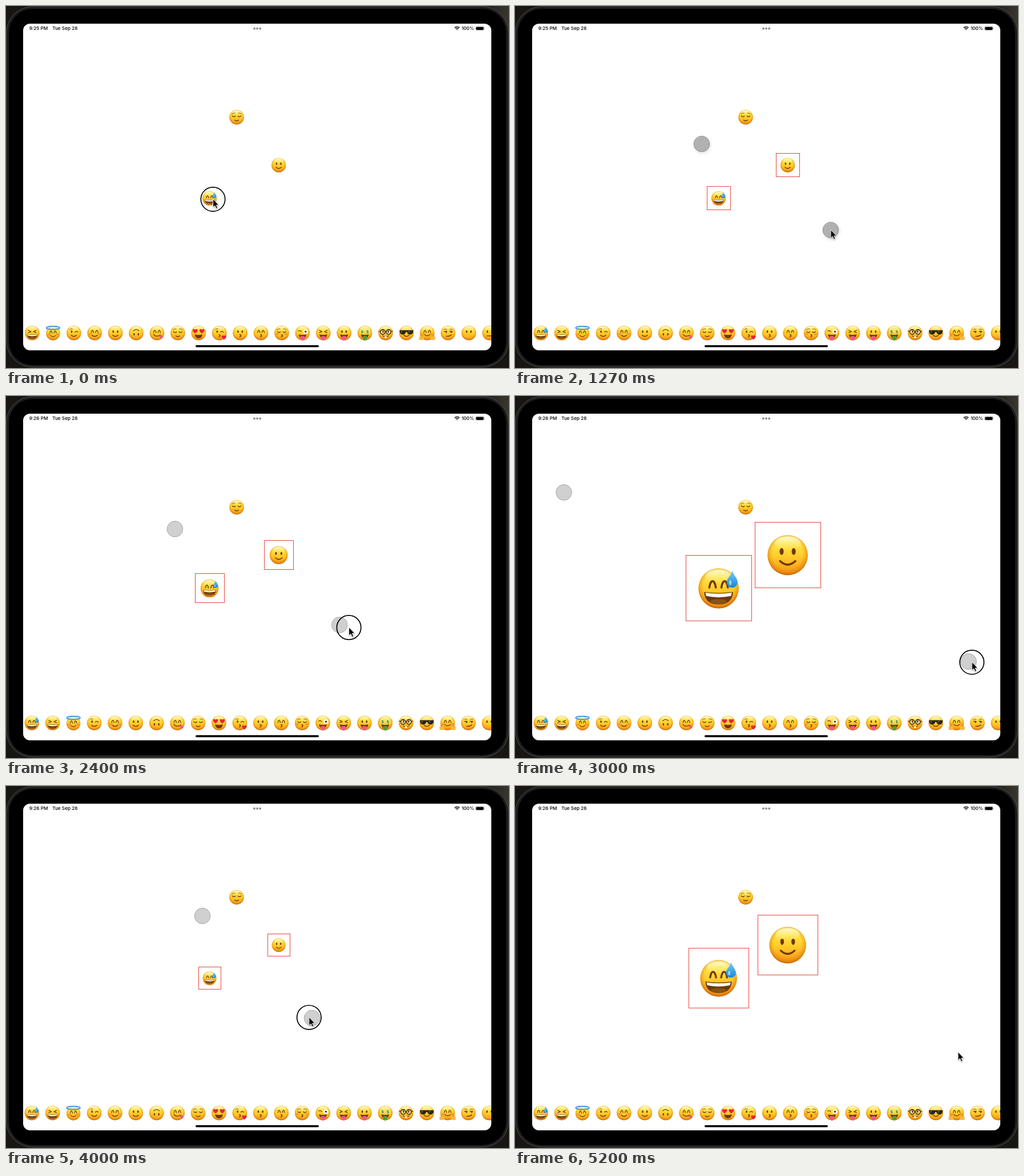
An HTML page that plays this animation: 881 by 635 pixels, repeating every 5270 ms.

```html
<!DOCTYPE html>
<html lang="en">
<head>
<meta charset="utf-8">
<title>Pinch to resize</title>
<style>
  html, body { margin: 0; width: 100%; height: 100%; overflow: hidden; background: #171612; }
  svg { display: block; width: 881px; height: 635px; }
  .status { font: 500 8.2px Inter, "Liberation Sans", sans-serif; fill: #000; }
  .line { fill: none; stroke: #6b390d; stroke-width: 5; stroke-linecap: round; stroke-linejoin: round; }
  .brow { fill: none; stroke: #8f530d; stroke-width: 4; stroke-linecap: round; }
  .dark { fill: #6b390d; }
  .frame { fill: none; stroke: #e2493f; stroke-width: 1; }
  .money { font: bold 30px "Liberation Sans", sans-serif; fill: #3d7a1a; text-anchor: middle; }
  .touch circle { stroke-width: .8; }
  .touch.hover circle { fill: rgba(0,0,0,.25); stroke: #808080; filter: drop-shadow(1.5px 2.5px 2.5px rgba(0,0,0,.3)); }
  .touch.down circle { fill: rgba(0,0,0,.185); stroke: #999; }
</style>
</head>
<body>
<svg viewBox="0 0 881 635">
  <defs>
    <linearGradient id="skin" x2="0" y2="1">
      <stop offset="0" stop-color="#fff08a"/>
      <stop offset=".22" stop-color="#ffe348"/>
      <stop offset=".55" stop-color="#ffca29"/>
      <stop offset=".85" stop-color="#f9a41b"/>
      <stop offset="1" stop-color="#f09215"/>
    </linearGradient>
    <radialGradient id="rim" cy=".46" r=".55">
      <stop offset=".68" stop-color="#e07a08" stop-opacity="0"/>
      <stop offset=".87" stop-color="#dc7407" stop-opacity=".45"/>
      <stop offset="1" stop-color="#ac5203" stop-opacity=".9"/>
    </radialGradient>
    <linearGradient id="shine" x2="0" y2="1">
      <stop offset="0" stop-color="#fffde0" stop-opacity=".8"/>
      <stop offset="1" stop-color="#fff6a0" stop-opacity="0"/>
    </linearGradient>
    <linearGradient id="water" x2="0" y2="1">
      <stop offset="0" stop-color="#7fcdf5"/>
      <stop offset="1" stop-color="#1386dc"/>
    </linearGradient>
    <linearGradient id="corner">
      <stop offset="0" stop-color="#1a1916"/>
      <stop offset="1" stop-color="#3a372f"/>
    </linearGradient>
    <clipPath id="screen"><rect x="30" y="31" width="820" height="573" rx="12"/></clipPath>
    <g id="base">
      <circle r="50" fill="url(#skin)"/>
      <circle r="50" fill="url(#rim)"/>
      <ellipse cy="-29" rx="33" ry="17" fill="url(#shine)"/>
    </g>
    <g id="faces"></g>
  </defs>

  <rect width="881" height="635" fill="#171612"/>
  <rect x="830" width="51" height="50" fill="url(#corner)"/>
  <rect x=".7" y="1" width="879.6" height="632.5" rx="46" fill="#1b1b1b" stroke="#555" stroke-width=".9"/>
  <rect x="4.5" y="4.5" width="872" height="626" rx="42" stroke="#2c2c2c" stroke-width=".7"/>
  <rect x="30" y="31" width="820" height="573" rx="12" fill="#fff"/>

  <g class="status">
    <text id="clock" x="40.7" y="42">9:25 PM</text>
    <text x="81.2" y="42">Tue Sep 28</text>
    <text x="820" y="42" text-anchor="end">100%</text>
  </g>
  <g fill="#8e8e90"><circle cx="435" cy="39.5" r="1.9"/><circle cx="440" cy="39.5" r="1.9"/><circle cx="445.2" cy="39.5" r="1.9"/></g>
  <g fill="none" stroke="#000" stroke-width="1.4">
    <path d="M785.8 38.2a6 6 0 0 1 8.6 0M787.5 40a3.6 3.6 0 0 1 5.2 0"/>
    <path d="M790.1 42.4l-1.2-1.3a1.8 1.8 0 0 1 2.4 0z" fill="#000" stroke="none"/>
  </g>
  <rect x="822.4" y="35.8" width="15" height="7" rx="2.1" fill="none" stroke="#999" stroke-width=".6"/>
  <rect x="823.3" y="36.7" width="13.2" height="5.2" rx="1.4"/>
  <path d="M838.3 38.2q1.3 1 0 2.2z" fill="#888"/>

  <g clip-path="url(#screen)">
    <g id="dock"></g>
    <use href="#relieved" transform="translate(404 195) scale(.255)"/>
    <g id="items"></g>
  </g>
  <rect x="332" y="595" width="216" height="3.6" rx="1.8"/>

  <g id="touch" class="touch"><circle r="13.8"/><circle r="13.8"/></g>
  <circle id="ring" r="21.2" fill="none" stroke="#000" stroke-width="1.7"/>
  <path id="cursor" d="M0-.5V14.2L3.3 11.1L5.7 16.4L8.2 15.3L5.8 10.2H10.2Z" stroke="#fff" stroke-width="1"
    style="filter:drop-shadow(0 1px 1px rgba(0,0,0,.35))"/>
</svg>

<script>
const $ = id => document.getElementById(id);

// Face parts, in a space where the head has radius 50
const line = d => `<path class="line" d="${d}"/>`;
const fill = (d, c) => `<path d="${d}" fill="${c}"/>`;
const eye = x => `<ellipse class="dark" cx="${x}" cy="-9" rx="5" ry="8.5"/>`;
const heart = (x, y, s) =>
  `<path transform="translate(${x} ${y}) scale(${s})" d="M0 15C-26-2-15-20 0-9C15-20 26-2 0 15Z" fill="#e8243c"/>`;
const dots = eye(-15) + eye(15);
const happyEye = x => line(`M${x - 8}-2C${x - 5}-23 ${x + 5}-23 ${x + 8}-2`);
const happy = happyEye(-15) + happyEye(15);
const shut = line('M-30-9Q-19 3-9-8M30-9Q19 3 9-8');
const squint = line('M-27-18L-9-9L-27-1M27-18L9-9L27-1');
const brows = '<path class="brow" d="M-31-22Q-22-31-11-27M31-22Q22-31 11-27"/>';
const wink = eye(-15) + line('M8-6Q17-15 28-6') + '<path class="brow" d="M-27-24Q-18-31-9-26"/>';
const smile = line('M-19 15Q0 33 19 15');
const blush = '<g fill="#f0602a" opacity=".45"><ellipse cx="-31" cy="8" rx="11" ry="7"/><ellipse cx="31" cy="8" rx="11" ry="7"/></g>';
const grin = fill('M-36 9Q0 14 36 9Q34 40 0 40Q-34 40-36 9Z', '#6b390d')
  + fill('M-33 11Q0 16 33 11L31 19Q0 26-31 19Z', '#f8f8f4')
  + '<ellipse cy="33" rx="21" ry="6" fill="#855414"/>';
const open = fill('M-27 10Q0 17 27 10Q23 37 0 37Q-23 37-27 10Z', '#6b390d');
const tongue = c => open + fill('M-14 22H14V38A14 14 0 0 1-14 38Z', c);
const kiss = line('M-3 11Q11 12 1 19Q11 22-3 28');
const PINK = '#f2558c';

const faces = {
  sweat: happy + grin
    + fill('M34-44C38-31 47-25 47-15A13.5 13.5 0 0 1 20-15C20-25 31-31 34-44Z', 'url(#water)')
    + '<ellipse cx="29" cy="-14" rx="3" ry="6" fill="#c9edff" opacity=".7"/>',
  laugh: squint + grin,
  angel: happy + blush + smile,
  wink: wink + smile,
  blush: happy + blush + smile,
  slight: dots + smile,
  flipped: `<g transform="rotate(180)">${dots + smile}</g>`,
  yum: happy + line('M-24 9Q-6 33 24 14') + fill('M14 22L29 14Q46 28 37 37Q26 43 14 22Z', PINK),
  relieved: brows + shut + line('M-14 20Q0 31 14 20'),
  love: heart(-23, -13, 1.1) + heart(23, -13, 1.1) + open,
  blowKiss: wink + kiss + heart(32, 30, 1.05),
  kiss: dots + kiss,
  kissHappy: happy + kiss,
  kissShut: shut + brows + blush + kiss,
  zany: line('M-29-13Q-18-20-9-10') + '<circle cx="21" cy="-9" r="16" fill="#fff"/><circle class="dark" cx="21" cy="-9" r="7"/>' + tongue(PINK),
  squintTongue: squint + tongue(PINK),
  tongue: dots + tongue(PINK),
  money: '<g fill="#e9eb8b"><ellipse cx="-18" cy="-10" rx="14" ry="17"/><ellipse cx="18" cy="-10" rx="14" ry="17"/></g>'
    + '<g class="money"><text x="-18" y="1">$</text><text x="18" y="1">$</text></g>' + tongue('#4f9f35'),
  nerd: '<g fill="#ffe9a0" stroke="#2b2520" stroke-width="6"><circle cx="-20" cy="-7" r="16"/><circle cx="20" cy="-7" r="16"/></g>'
    + line('M-48-12L-37-10M48-12L37-10M-4-8H4') + eye(-18) + eye(18)
    + line('M-21 18Q0 38 21 18') + fill('M-8 25H8V34H-8Z', '#fff'),
  cool: fill('M-48-19H48L44 1Q36 13 21 11Q8 9 4-7H-4Q-8 9-21 11Q-36 13-44 1Z', '#27231f')
    + fill('M-38-13L-25-13L-35 1Z M14-13L27-13L17 1Z', '#6d6862') + smile,
  hug: happy + blush + line('M-19 11Q0 27 19 11')
    + [-1, 1].map(s => `<g transform="scale(${s} 1)" fill="#fdb93a" stroke="#d98412" stroke-width="2">`
      + '<path d="M20 40Q17 25 27 24L34 15L38 25L48 18L47 29L57 30L50 37L56 44L44 46Q28 50 20 40Z"/></g>').join(''),
  smirk: '<g class="dark"><ellipse cx="-13" cy="-6" rx="5" ry="6"/><ellipse cx="23" cy="-6" rx="5" ry="6"/></g>'
    + line('M-27-10Q-18-13-8-11M11-11Q20-13 30-10')
    + '<path class="brow" d="M-28-24Q-18-29-8-24M11-24Q21-29 30-24"/>' + line('M-12 23Q12 25 24 13'),
  mute: dots,
  neutral: dots + line('M-18 20H18'),
};

const halo = '<ellipse cy="-35" rx="46" ry="11" fill="none" stroke="#2f7fd0" stroke-width="8"/>'
  + '<ellipse cy="-36" rx="46" ry="11" fill="none" stroke="#7cc4f6" stroke-width="3"/>';
const names = Object.keys(faces);
$('faces').innerHTML = names.map(n => n === 'angel'
  ? `<g id="angel"><g transform="translate(0 3) scale(.95)"><use href="#base"/>${faces[n]}</g>${halo}</g>`
  : `<g id="${n}"><use href="#base"/>${faces[n]}</g>`).join('');
$('dock').innerHTML = names.map((n, i) =>
  `<use href="#${n}" transform="translate(${45.3 + 36.41 * i} 573.5) scale(.255)"/>`).join('');

const items = [
  { face: 'sweat', x: 357, y: 337.3, picked: 530 },
  { face: 'slight', x: 478, y: 279, picked: 1000 },
];
$('items').innerHTML = items.map(o => `<use href="#${o.face}"/><rect class="frame"/>`).join('');
items.forEach((o, i) => [o.emoji, o.frame] = [...$('items').children].slice(i * 2, i * 2 + 2));

// Time, pointer x, pointer y, selection size
const keys = [
  [0, 362.5, 339, 41], [590, 362.5, 339, 41], [860, 478, 271, 41], [1000, 478, 271, 41],
  [1200, 553, 393, 41], [2270, 553, 393, 41], [2400, 600, 406, 51.2], [2670, 698, 434, 81],
  [3000, 800, 467, 115], [3250, 818, 469, 122], [3650, 660, 438, 76], [4000, 531, 406, 39],
  [4060, 528, 405.5, 38.4], [4270, 625, 428, 58], [4470, 703, 446, 81.2], [4800, 768, 465, 102],
  [4930, 776, 467, 105], [5270, 776, 467, 105],
];
const slope = (i, c) => (keys[i + 1][c] - keys[i][c]) / (keys[i + 1][0] - keys[i][0]);
function tangent(i, c) {
  if (i === 0 || i === keys.length - 1) return 0;
  const a = slope(i - 1, c), b = slope(i, c);
  return a * b > 0 ? 2 * a * b / (a + b) : 0;
}
// Monotone cubic interpolation
function at(t, c) {
  let i = 0;
  while (i < keys.length - 2 && keys[i + 1][0] <= t) i++;
  const h = keys[i + 1][0] - keys[i][0], u = Math.max(0, (t - keys[i][0]) / h), v = 1 - u;
  return v * v * (1 + 2 * u) * keys[i][c] + u * u * (3 - 2 * u) * keys[i + 1][c]
    + h * u * v * (v * tangent(i, c) - u * tangent(i + 1, c));
}

const LOOP = 5270, STEP = LOOP / 79, LAG = 38;
const presses = [[0, 130], [400, 530], [860, 1000], [1870, 5070]];
const show = (el, on) => el.setAttribute('visibility', on ? 'visible' : 'hidden');
const move = (el, x, y, s = 1) => el.setAttribute('transform', `translate(${x} ${y}) scale(${s})`);
const snap = v => Math.round(v - .5) + .5;
const [touchA, touchB] = $('touch').children;

function draw(now) {
  // The picture advances 15 times per second
  const t = Math.floor((now % LOOP) / STEP + .06) * STEP;
  const x = at(t, 1), y = at(t, 2), size = at(t, 3);

  const p = Math.min(1, Math.max(0, (t - 100) / 300));
  move($('dock'), -35.7 * (1 - p * p * (3 - 2 * p)), 0);
  $('clock').textContent = t < 1900 ? '9:25 PM' : '9:26 PM';

  const side = Math.round(size);
  for (const o of items) {
    move(o.emoji, o.x - .4, o.y, size * .613 / 100);
    const box = { x: snap(o.x - side / 2), y: snap(o.y - side / 2), width: side, height: side };
    for (const k in box) o.frame.setAttribute(k, box[k]);
    show(o.frame, t >= o.picked);
  }

  const gx = at(t - LAG, 1), gy = at(t - LAG, 2);
  move(touchA, gx, gy);
  move(touchB, 880 - gx, 635 - gy);
  $('touch').setAttribute('class', 'touch ' + (t < 1870 ? 'hover' : 'down'));
  show($('touch'), t > 1125 && t < 5070);

  move($('ring'), x, y);
  show($('ring'), presses.some(([a, b]) => t >= a && t < b));
  move($('cursor'), x, y);
}

let start;
function tick(now) {
  start ??= now;
  draw(now - start);
  requestAnimationFrame(tick);
}
draw(0);
requestAnimationFrame(tick);
</script>
</body>
</html>
```
